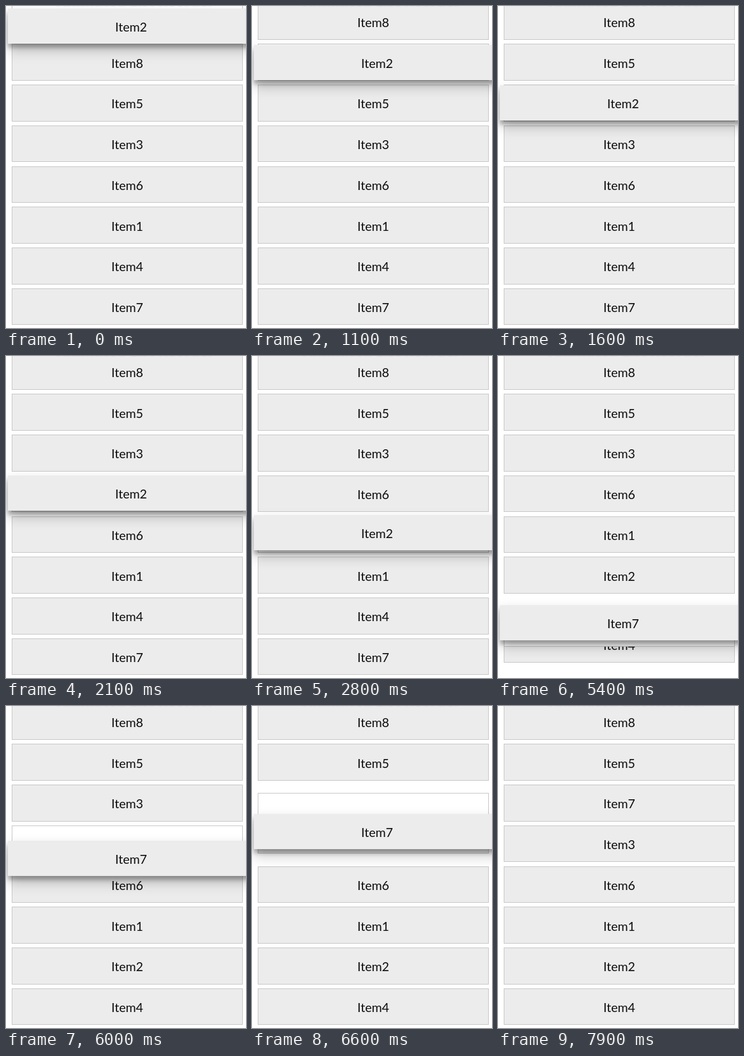
Write an HTML page that moves like this. It is 376 by 504 pixels and loops after 8000 ms.

```html
<!DOCTYPE html>
<html lang="en">
<head>
<meta charset="utf-8">
<title>Sortable list</title>
<style>
  html, body { margin: 0; width: 100%; height: 100%; overflow: hidden; background: #fff; }
  svg { display: block; width: 376px; height: 504px; }
  text { font: 19.6px Lato, sans-serif; text-anchor: middle; fill: #0c0c0c; }
  .title { font: 700 22px "Open Sans", sans-serif; fill: #555; }
</style>
</head>
<body>
<svg id="stage" viewBox="0 0 376 504">
  <defs>
    <filter id="soft" x="-10%" y="-50%" width="120%" height="200%"><feGaussianBlur stdDeviation="0.8"/></filter>
    <filter id="near" x="-10%" y="-60%" width="120%" height="220%"><feGaussianBlur stdDeviation="3"/></filter>
    <filter id="far" x="-10%" y="-80%" width="120%" height="260%"><feGaussianBlur stdDeviation="10"/></filter>
  </defs>
  <g id="list"></g>
  <text class="title" x="203" y="-1" filter="url(#soft)">Animated List Reorder</text>
  <g id="preview">
    <rect y="10" width="386" height="55" fill-opacity=".23" filter="url(#far)"/>
    <rect y="6" width="386" height="55" fill-opacity=".27" filter="url(#near)"/>
    <rect width="386" height="55" fill="#ececec"/>
    <text id="label" x="193" y="36"></text>
  </g>
</svg>
<script>
const LOOP = 8000, SETTLE = 250;
const ROW = 57.6, PITCH = 63.75, FIRST = -4.5;

const NS = "http://www.w3.org/2000/svg";
const $ = id => document.getElementById(id);
const clamp = v => Math.min(1, Math.max(0, v));
const ease = p => 1 - (1 - clamp(p)) ** 3;
const slotTop = s => FIRST + PITCH * s;

// Each path holds a few [time, top] points.
const drags = [
  { from: 0, to: 5, reach: -33, drop: 3650,
    path: [[200, 4], [700, 58], [900, 58], [1100, 61], [2100, 187], [2800, 249], [3550, 320]] },
  { from: 7, to: 2, reach: 53, drop: 7100,
    path: [[5300, 440], [5700, 240], [6000, 211], [7100, 134]] }
];

// Reads a path either way: time to top, or top to time.
function along(path, v, a = 0, b = 1) {
  const last = path.length - 1;
  const dir = Math.sign(path[last][a] - path[0][a]);
  let i = 1;
  while (i < last && (path[i][a] - v) * dir < 0) i++;
  const p = path[i - 1], q = path[i];
  return p[b] + (q[b] - p[b]) * clamp((v - p[a]) / (q[a] - p[a]));
}

function add(parent, tag, attrs) {
  const el = document.createElementNS(NS, tag);
  for (const k in attrs) el.setAttribute(k, attrs[k]);
  return parent.appendChild(el);
}

const rows = [2, 8, 5, 3, 6, 1, 4, 7].map((id, slot) => {
  const box = add($("list"), "rect", { x: 9.5, width: 361, stroke: "#c8c8c8" });
  const text = add($("list"), "text", { x: 190 });
  text.textContent = "Item" + id;
  return { id, slot, box, text, moves: [] };
});

// A neighbour swaps with the dragged row once the row reaches its slot.
const order = [...rows];
for (const d of drags) {
  const dir = Math.sign(d.to - d.from);
  d.row = order[d.from];
  d.start = d.from ? d.path[0][0] : 0;
  for (let s = d.from + dir; s !== d.to + dir; s += dir) {
    const at = along(d.path, slotTop(s) + d.reach, 1, 0);
    order[s].moves.push({ at, by: -dir });
    d.row.moves.push({ at, by: dir });
  }
  order.splice(d.from, 1);
  order.splice(d.to, 0, d.row);
}

function render(t) {
  const drag = drags.find(d => t >= d.start && t < d.drop + SETTLE);
  for (const r of rows) {
    const slot = r.moves.reduce((s, m) => s + m.by * ease((t - m.at) / SETTLE), r.slot);
    const y = slotTop(slot), top = Math.round(y);
    const held = drag && drag.row === r;
    r.box.setAttribute("y", top + 0.5);
    r.box.setAttribute("height", Math.round(y + ROW) - top - 1);
    r.box.setAttribute("fill", held ? "#fff" : "#ececec");
    r.text.setAttribute("y", Math.round(y + 37.3));
    r.text.setAttribute("visibility", held ? "hidden" : "visible");
  }
  $("preview").setAttribute("visibility", drag ? "visible" : "hidden");
  if (!drag) return;
  const p = ease((t - drag.drop) / SETTLE);
  const y = along(drag.path, t);
  const top = Math.round(y + (slotTop(drag.to) - y) * p);
  $("preview").setAttribute("transform", `translate(${3 + 6 * p} ${top})`);
  $("label").textContent = "Item" + drag.row.id;
}

const begin = performance.now();
function tick() {
  render((performance.now() - begin) % LOOP);
  requestAnimationFrame(tick);
}
tick();
</script>
</body>
</html>
```
